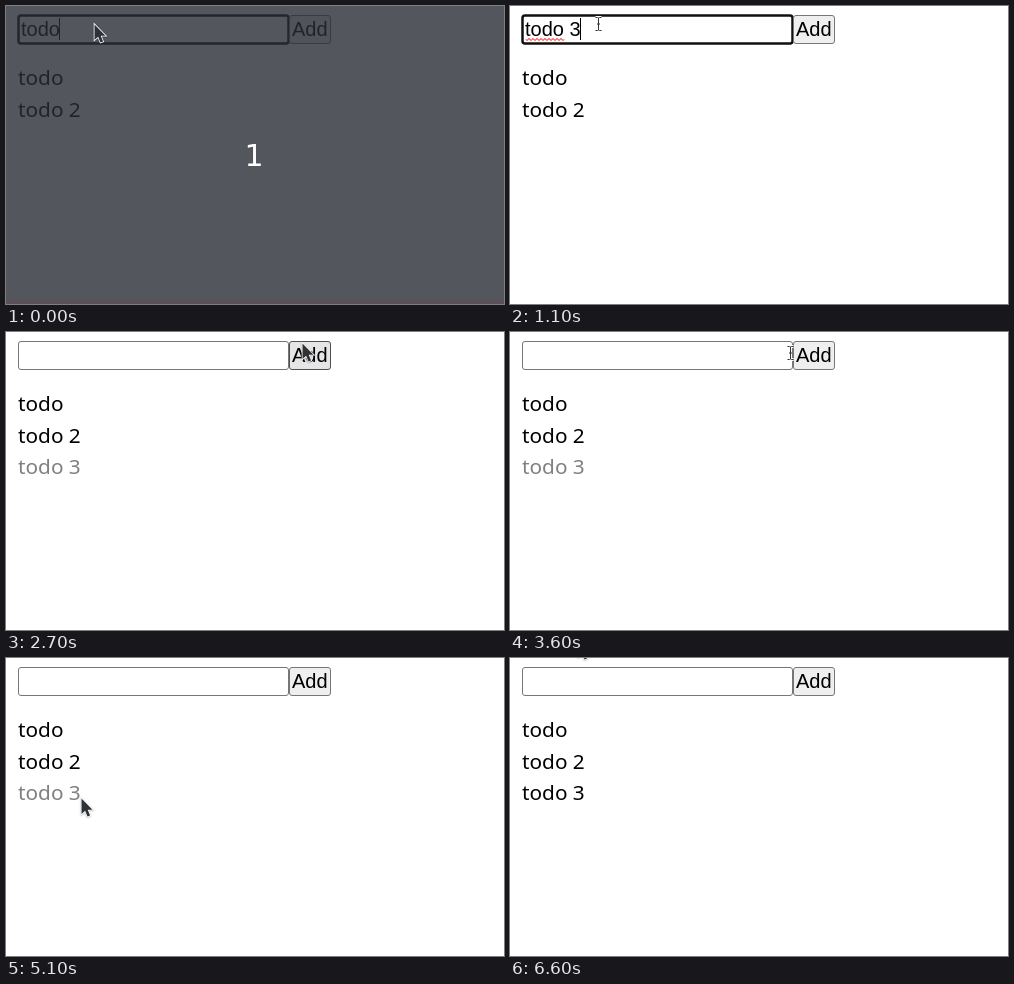
These frames come from a looping animation (498 by 298 pixels, 6.9 s). An HTML page with a canvas:

```html
<!DOCTYPE html>
<html lang="en">
<head>
<meta charset="utf-8">
<title>Todo list</title>
<style>
  html, body { margin: 0; width: 100%; height: 100%; overflow: hidden; background: #fff; }
  canvas { display: block; }
</style>
</head>
<body>
<canvas id="stage" width="498" height="298"></canvas>
<script>
const ctx = document.getElementById('stage').getContext('2d');
const LOOP = 6900, STEP = 100;
const UI = '20px "Liberation Sans", Arial, sans-serif';
const LIST = '20.8px "Noto Sans", sans-serif';

// Pointer keys: time, x, y
const path = [
  [0, 88, 18], [1500, 88, 18], [1900, 276, 11], [2000, 276, 11], [2100, 279, 12],
  [2200, 289, 16], [2300, 296, 11], [3500, 296, 11], [4100, 75, 140], [5900, 75, 140],
  [6200, 66, 55], [6400, 68, -14], [6500, 68, -14], [6600, 68, -17], [LOOP, 68, -17]
];

function pointerAt(t) {
  const i = path.findIndex(key => key[0] > t);
  const [t0, x0, y0] = path[i - 1], [t1, x1, y1] = path[i];
  const u = (t - t0) / (t1 - t0), e = u * u * (3 - 2 * u);
  return [Math.round(x0 + (x1 - x0) * e), Math.round(y0 + (y1 - y0) * e)];
}

const between = (t, a, b) => t >= a && t < b;

function text(str, x, y, font, color = '#000') {
  ctx.font = font;
  ctx.fillStyle = color;
  ctx.fillText(str, x, y);
}

function box(x, w, fill, stroke, line = 1) {
  ctx.beginPath();
  ctx.roundRect(x, 9.5, w, 28, 2.5);
  ctx.fillStyle = fill;
  ctx.fill();
  ctx.strokeStyle = stroke;
  ctx.lineWidth = line;
  ctx.stroke();
}

function squiggle(x0, x1) {
  ctx.beginPath();
  for (let x = x0; x <= x1; x += 0.5) ctx.lineTo(x, 33.5 + Math.sin((x - x0) * Math.PI / 2));
  ctx.strokeStyle = '#f00';
  ctx.lineWidth = 1;
  ctx.stroke();
}

function input(t) {
  const focused = t < 2500;
  const value = t < 700 ? 'todo' : t < 1100 ? 'todo ' : t < 2600 ? 'todo 3' : '';
  box(12.5, 270, '#fff', focused ? '#101010' : '#767676', focused ? 2.5 : 1);
  text(value, 15, 30, UI);
  if (between(t, 1100, 2600)) squiggle(16, 54);
  if (t < 600 || between(t, 700, 1600) || between(t, 2200, 2500)) {
    ctx.fillRect(Math.floor(15 + ctx.measureText(value).width), 12, 1, 22);
  }
}

function button(t, x, y) {
  const hover = between(x, 283, 325) && between(y, 9, 38);
  const pressed = between(t, 2500, 2600);
  box(283.5, 41, pressed ? '#f5f5f5' : hover ? '#e5e5e5' : '#efefef',
    pressed ? '#8d8d8d' : hover ? '#4f4f4f' : '#767676');
  text('Add', 286, 30, UI);
}

function arrow(x, y) {
  const shape = new Path2D('M0 0V15.5L3.6 12.3L6 18L8.6 17L6.2 11.3H11Z');
  ctx.save();
  ctx.translate(x + 0.5, y + 0.5);
  ctx.shadowColor = 'rgba(0,0,0,.35)';
  ctx.shadowBlur = 1.5;
  ctx.shadowOffsetY = 0.5;
  ctx.strokeStyle = '#fff';
  ctx.lineWidth = 1.6;
  ctx.stroke(shape);
  ctx.shadowColor = 'transparent';
  ctx.fillStyle = '#2e3236';
  ctx.fill(shape);
  ctx.restore();
}

function beam(x, y) {
  const shape = new Path2D('M-3 -6.5H-1L0 -6L1 -6.5H3M0 -6V6M-3 6.5H-1L0 6L1 6.5H3M-1.5 0H1.5');
  ctx.save();
  ctx.translate(x + 0.5, y);
  for (const [color, width] of [['#fff', 3], ['#333', 1]]) {
    ctx.strokeStyle = color;
    ctx.lineWidth = width;
    ctx.stroke(shape);
  }
  ctx.restore();
}

function countdown() {
  ctx.fillStyle = 'rgba(40,44,52,.8)';
  ctx.fillRect(0, 0, 498, 298);
  ctx.fillStyle = '#5a5056';
  ctx.fillRect(0, 295, 498, 3);
  ctx.textAlign = 'center';
  text('1', 248, 160, '30px "DejaVu Sans", sans-serif', '#fff');
  ctx.textAlign = 'left';
}

function draw(now) {
  const t = Math.floor(now % LOOP / STEP) * STEP;
  const [x, y] = pointerAt(t);
  ctx.fillStyle = '#fff';
  ctx.fillRect(0, 0, 498, 298);
  input(t);
  button(t, x, y);
  text('todo', 12, 79, LIST);
  text('todo 2', 12, 111, LIST);
  if (t >= 2600) text('todo 3', 12, 142, LIST, t < 5700 ? '#808080' : '#000');
  if (t < 100) countdown();
  const overInput = between(x, 12, 283) && between(y, 9, 38);
  if (overInput && t >= 100) beam(x, y);
  else arrow(x, y);
}

const start = performance.now();
(function tick() {
  draw(performance.now() - start);
  requestAnimationFrame(tick);
})();
</script>
</body>
</html>
```
